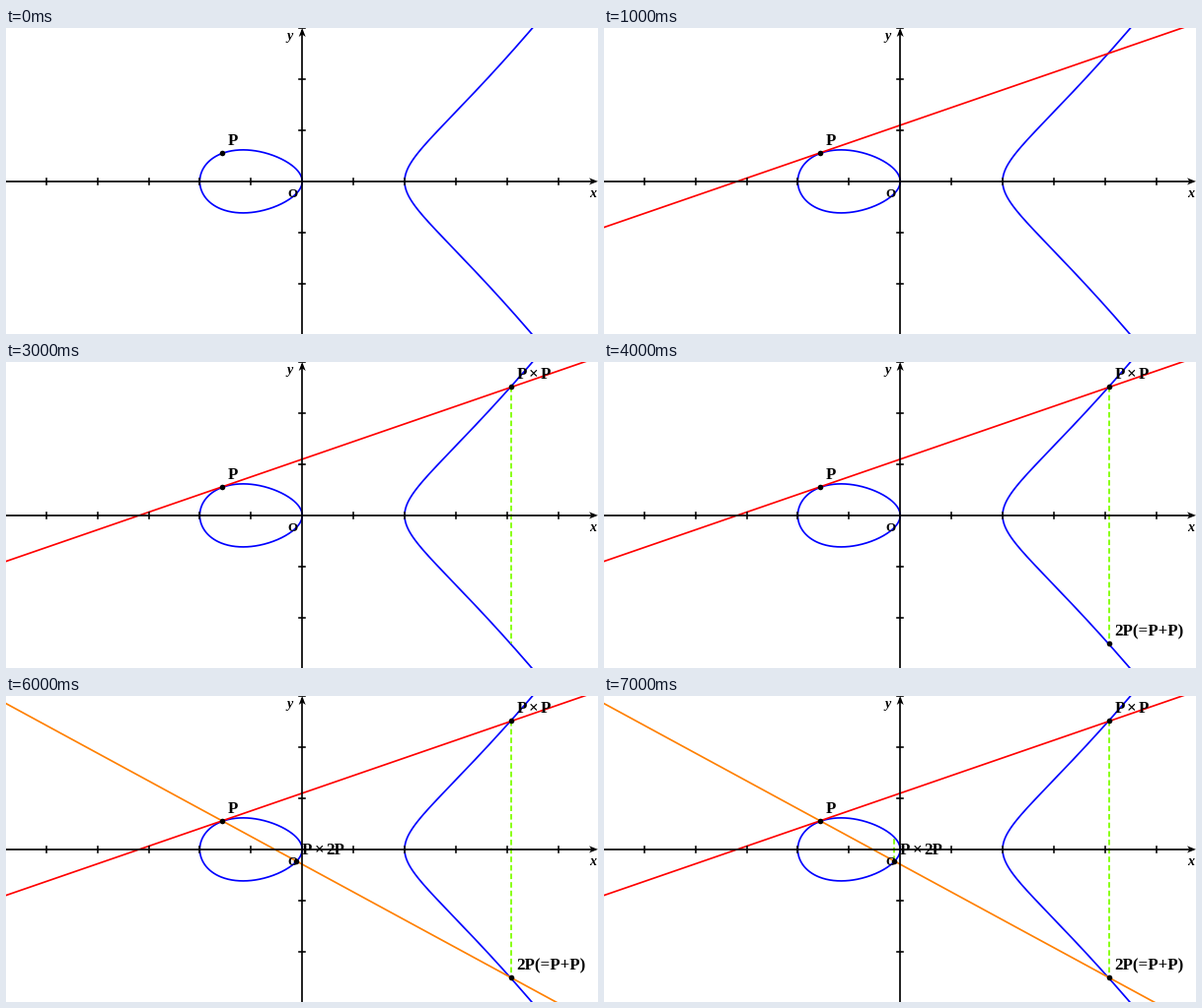
Animation, 600 px wide and 311 px high, one loop 8 s. Source, as a matplotlib script:

```python
import numpy as np
import matplotlib.pyplot as plt
from matplotlib.animation import FuncAnimation

W, H, DPI = 600, 311, 100
OX, OY, UNIT = 300.2, 155.9, 51.9
PX = 72 / DPI  # points per pixel

P = (219.3, 127)
PXP = (512, 25.2)
TWO_P = (512, 286.3)
PX2P = (294, 167.6)

fig = plt.figure(figsize=(W / DPI, H / DPI), dpi=DPI, facecolor="white")
ax = fig.add_axes([0, 0, 1, 1])
ax.set_xlim(0, W)
ax.set_ylim(H, 0)
ax.axis("off")


def line(xs, ys, color, width=1.7, z=2, **kw):
    return ax.plot(xs, ys, color=color, lw=width * PX, zorder=z, **kw)[0]


def extend(a, b):
    """Line through a and b across the whole stage."""
    slope = (b[1] - a[1]) / (b[0] - a[0])
    xs = np.array([-5, W + 5])
    return xs, a[1] + slope * (xs - a[0])


def dashed(x, y0, y1):
    return line([x, x], [y0, y1], "#80ff00", 1.8, 2.5,
                dashes=(3.1, 1.7), dash_capstyle="butt")


def text(x, y, s, size=17, style="normal"):
    return ax.text(x, y, s, fontsize=size * PX, family="Liberation Serif",
                   weight="bold", style=style, va="baseline", zorder=6)


def product(x, y, right):
    return [text(x, y, "P"), text(x + 12.8, y, "×"), text(x + 24.8, y, right)]


def dot(p):
    return ax.plot(*p, "o", ms=5.6 * PX, color="black", mew=0, zorder=5)[0]


def curve(x):
    y = np.sqrt(np.maximum(0.1237 * (x**3 - 4 * x), 0))
    for sign in (1, -1):
        line(OX + UNIT * x, OY + sign * UNIT * y, "#0000ff")


def draw_axes():
    line([0, W - 3], [OY, OY], "black", z=3)
    line([OX, OX], [3, H], "black", z=3)
    for k in range(-5, 6):
        if k:
            x, y = OX + k * UNIT, OY + k * UNIT
            line([x, x], [OY - 3, OY + 3], "black", 1.6, 3)
            line([OX - 3, OX + 3], [y, y], "black", 1.6, 3)
    head = np.array([(0, 0), (-9, -3.5), (-6.5, 0), (-9, 3.5)])
    ax.fill(W + head[:, 0], OY + head[:, 1], color="black", lw=0, zorder=3)
    ax.fill(OX + head[:, 1], -head[:, 0], color="black", lw=0, zorder=3)
    text(284, 12, "y", 14, "italic")
    text(591.5, 172, "x", 14, "italic")
    text(285, 171.5, "O", 13)


draw_axes()
curve(-1 - np.cos(np.linspace(0, np.pi, 200)))
curve(2 + np.linspace(0, 1.7, 200) ** 2)
dot(P)
text(224.7, 119, "P")

# Each step adds one group and keeps the earlier ones.
steps = [
    [],
    [line(*extend((0, 202.6), (586, 0)), "#ff0000")],
    [dot(PXP)] + product(517.2, 17, "P"),
    [dashed(512, 25.2, 286.3)],
    [dot(TWO_P), text(517, 278, "2P(=P+P)")],
    [line(*extend(P, TWO_P), "#ff8000")],
    [dot(PX2P)] + product(299.5, 160.8, "2P"),
    [dashed(294, 167.6, 144)],
]


def update(frame):
    for i, group in enumerate(steps):
        for artist in group:
            artist.set_visible(i <= frame)
    return [artist for group in steps for artist in group]


anim = FuncAnimation(fig, update, frames=len(steps), interval=1000,
                     repeat=True, repeat_delay=0, blit=False)
plt.show()
```
